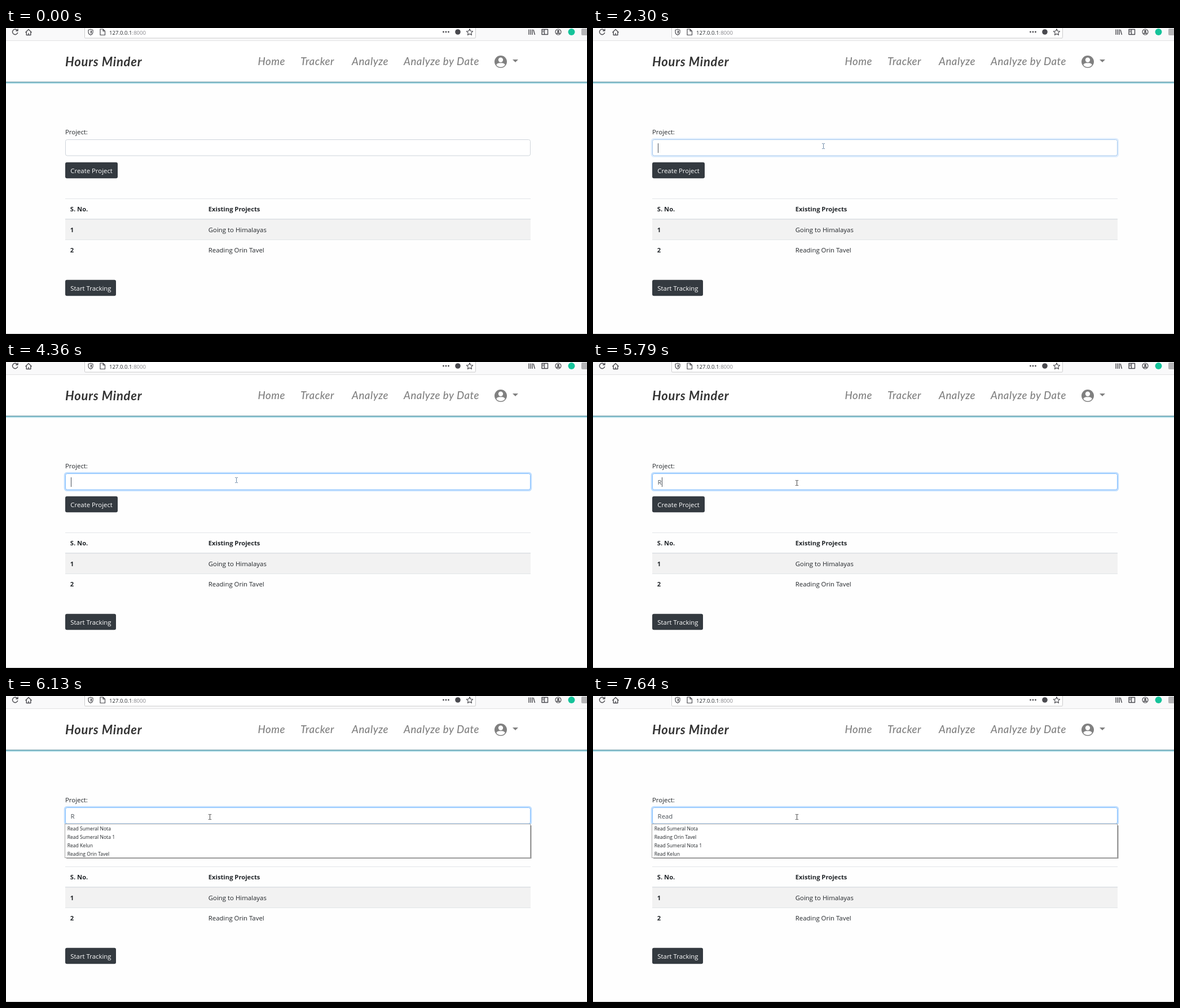
Recreate the animation shown at these times as an HTML page. Size 1030x544 px, loop 8 s.

```html
<!DOCTYPE html>
<html lang="en">
<head>
<meta charset="utf-8">
<title>Project page</title>
<style>
html, body { margin: 0; width: 100%; height: 100%; overflow: hidden; background: #fefefe; }
svg { display: block; width: 1030px; height: 544px; }
text { font: 11.4px "Open Sans", "Noto Sans", sans-serif; fill: #212529; white-space: pre; }
.b { font-size: 11.2px; font-weight: 700; }
.w { fill: #fff; }
.url { font-size: 9.6px; }
.nav { font: italic 500 18.7px Lato, sans-serif; letter-spacing: .5px; fill: #808080; }
.brand { font: italic 700 22px Lato, sans-serif; letter-spacing: .75px; fill: #343434; }
.small { font-size: 8.6px; }
.typed { fill: #495057; }
.icon { fill: none; stroke: #4a4a4f; stroke-width: 1.4; stroke-linejoin: round; }
</style>
</head>
<body>
<svg viewBox="0 0 1030 544">
  <!-- browser bar -->
  <rect width="1030" height="22" fill="#f9f9fa"/>
  <rect y="22" width="1030" height="1" fill="#e1e1e2"/>
  <path d="M139.500 -2V16.500a1.500 1.500 0 0 0 1.500 1.500H831a1.500 1.500 0 0 0 1.500 -1.500V-2" fill="#fff" stroke="#cbcbcc"/>
  <g class="icon">
    <path d="M20 4.200A4.700 4.700 0 1 0 20.800 8M21 1.500V5H17.300"/>
    <path d="M34.500 8L40 2.500L45.500 8M36.200 7V12.500H43.800V7M40 12.500V9"/>
    <path d="M150 2.200L154 3.500V7C154 9.500 152.500 11.500 150 12.500C147.500 11.500 146 9.500 146 7V3.500Z" stroke-width="1.200"/>
    <path d="M167 2H172L175.500 5.500V12.500H167ZM172 2V5.500H175.500" stroke-width="1.200"/>
    <path d="M822 1.800L823.700 5.500L827.600 5.900L824.700 8.600L825.500 12.500L822 10.500L818.500 12.500L819.300 8.600L816.400 5.900L820.300 5.500Z" stroke-width="1.200"/>
    <path d="M927 2.500V12M930 2.500V12M933 2.500V12M935 3L937.500 12"/>
    <path d="M950 2.500H960.500V11.500H950ZM954.500 2.500V11.500M951.500 5H953M951.500 7H953"/>
    <circle cx="979" cy="7" r="5" stroke-width="1.200"/>
  </g>
  <g fill="#4a4a4f">
    <circle cx="775.500" cy="7" r="1.400"/><circle cx="780" cy="7" r="1.400"/><circle cx="784.500" cy="7" r="1.400"/>
    <circle cx="801" cy="7" r="4.800"/>
    <path d="M150 4.300L152 5V7C152 8.700 151.200 9.700 150 10.500Z"/>
    <circle cx="979" cy="5.500" r="1.900"/><path d="M975.800 10a3.200 2.200 0 0 1 6.400 0Z"/>
  </g>
  <circle cx="1002.500" cy="7" r="6" fill="#15c39a"/>
  <rect x="1020" y="1" width="12" height="12" rx="2" fill="#b5b5b7"/>
  <text class="url" x="183" y="12">127.0.0.1<tspan fill="#85858a">:8000</tspan></text>

  <!-- site header -->
  <rect y="23" width="1030" height="72" fill="#fff"/>
  <rect y="95" width="1030" height="1" fill="#b0c6cc"/>
  <rect y="96" width="1030" height="1" fill="#6ba8b7"/>
  <rect y="97" width="1030" height="1" fill="#8fcad7"/>
  <rect y="98" width="1030" height="1" fill="#cae8ef"/>
  <rect y="99" width="1030" height="1" fill="#eef8fa"/>
  <text class="brand" x="105" y="68">Hours Minder</text>
  <text class="nav" x="446.500" y="65.500">Home</text>
  <text class="nav" x="522" y="65.500">Tracker</text>
  <text class="nav" x="613" y="65.500">Analyze</text>
  <text class="nav" x="705" y="65.500">Analyze by Date</text>
  <circle cx="877" cy="60" r="11" fill="#808080"/>
  <circle cx="877" cy="56.800" r="4.200" fill="#fff"/>
  <path d="M869.300 65.600C870.500 62.800 873 62.300 877 62.300S883.500 62.800 884.700 65.600A9.500 9.500 0 0 1 869.300 65.600Z" fill="#fff"/>
  <path d="M898 56H908L903 61Z" fill="#808080"/>

  <!-- form -->
  <text x="105" y="189">Project:</text>
  <rect x="105.500" y="198.500" width="824" height="28.500" rx="3" fill="#fff" stroke="#ced4da"/>
  <g id="focus" opacity="0">
    <rect x="104" y="197" width="827" height="31.500" rx="4" fill="none" stroke="#bfdeff" stroke-width="2.400"/>
    <rect x="105.500" y="198.500" width="824" height="28.500" rx="3" fill="#fff" stroke="#80bdff"/>
  </g>
  <text class="typed" id="typed" x="114.600" y="218"></text>
  <rect id="caret" y="205" width="1" height="17" fill="#495057" opacity="0"/>
  <rect x="105" y="238.700" width="93" height="28.500" rx="3" fill="#343a40"/>
  <text class="w" x="114.300" y="258">Create Project</text>

  <!-- table -->
  <rect x="105" y="303" width="825" height="1" fill="#e2e5e8"/>
  <rect x="105" y="340" width="825" height="36" fill="#f2f2f2"/>
  <rect x="105" y="339" width="825" height="1.500" fill="#dbdfe3"/>
  <rect x="105" y="376" width="825" height="1" fill="#e2e5e8"/>
  <text class="b" x="113.800" y="326">S. No.</text>
  <text class="b" x="358.800" y="326">Existing Projects</text>
  <text class="b" x="113.800" y="363">1</text>
  <text x="358.800" y="363">Going to Himalayas</text>
  <text class="b" x="113.800" y="399">2</text>
  <text x="358.800" y="399">Reading Orin Tavel</text>
  <rect x="105" y="447.800" width="90" height="28.500" rx="3" fill="#343a40"/>
  <text class="w" x="114.300" y="467">Start Tracking</text>
  <rect y="543" width="1030" height="1" fill="#cfcfcf"/>

  <!-- suggestions -->
  <g id="menu" opacity="0">
    <rect x="107" y="230" width="824.500" height="59" fill="#909090"/>
    <rect x="104.500" y="227.500" width="825" height="60" fill="#fff" stroke="#a6a6a6"/>
    <g id="items"></g>
  </g>

  <!-- pointers -->
  <circle id="click" cx="407" cy="209.500" r="9" fill="#ff0" fill-opacity=".47" opacity="0"/>
  <path id="arrow" d="M.5 .5V10L2.700 8L4.200 11.400L5.600 10.800L4.200 7.500H6.800Z" fill="#fff" stroke="#3c3c3c" stroke-width=".9" opacity="0"/>
  <path id="beam" d="M-2.500 -4.500H-.7L0 -4L.7 -4.500H2.500M0 -4V4M-2.500 4.500H-.7L0 4L.7 4.500H2.500" fill="none" stroke="#444" opacity="0"/>
</svg>
<script>
const LOOP = 8000;
const el = id => document.getElementById(id);
const names = ["Read Sumeral Nota", "Read Sumeral Nota 1", "Read Kelun", "Reading Orin Tavel"];

// Each row: start time, then values held until the next row.
const arrow = [[0], [710, 834, 465], [785, 768, 415], [860, 707, 373],
  [1260, 625, 338], [1350, 549, 301], [1680, 474, 251], [1760]];
const beam = [[0], [1760, 408.5, 210], [5000, 405, 213], [5080, 396, 219], [5160, 384, 223],
  [5240, 371, 221], [5330, 363, 217], [5410, 361.5, 215]];
const caret = [[0], [2300, 115], [2780], [3340, 115], [3800], [4360, 115], [4920],
  [5410, 115], [5790, 122], [6040], [6360, 128], [6620, 134], [6840, 141], [7090], [7240, 144], [7640]];
const typed = [[0, ""], [5790, "R"], [6360, "Re"], [6620, "Rea"], [6840, "Read"], [7240, "Read "]];
const focus = [[0, 0], [2300, .5], [2390, 1]];
const menu = [[0, 0], [6040, .5], [6130, 1]];
const order = [[0, "0123"], [6450, "0312"]];
const click = [[0, 0], [2140, 1], [2300, 0]];

const items = names.map((_, i) => {
  const row = document.createElementNS("http://www.w3.org/2000/svg", "text");
  row.setAttribute("class", "small");
  row.setAttribute("x", 108.7);
  row.setAttribute("y", 239 + i * 15);
  return el("items").appendChild(row);
});

const at = (table, t) => table.findLast(row => row[0] <= t).slice(1);
const fade = (id, v) => el(id).setAttribute("opacity", v);
const write = (node, s) => { if (node.textContent !== s) node.textContent = s; };

function place(id, table, t) {
  const [x, y = 0] = at(table, t);
  fade(id, x === undefined ? 0 : 1);
  if (x !== undefined) el(id).setAttribute("transform", `translate(${x} ${y})`);
}

function draw(now) {
  const t = now % LOOP;
  place("arrow", arrow, t);
  place("beam", beam, t);
  place("caret", caret, t);
  el("beam").setAttribute("stroke", t < 5000 ? "#6f8ba8" : "#444");
  fade("focus", at(focus, t)[0]);
  fade("menu", at(menu, t)[0]);
  fade("click", at(click, t)[0]);
  write(el("typed"), at(typed, t)[0]);
  [...at(order, t)[0]].forEach((n, i) => write(items[i], names[n]));
}

const start = performance.now();
function tick() {
  draw(performance.now() - start);
  requestAnimationFrame(tick);
}
tick();
</script>
</body>
</html>
```
